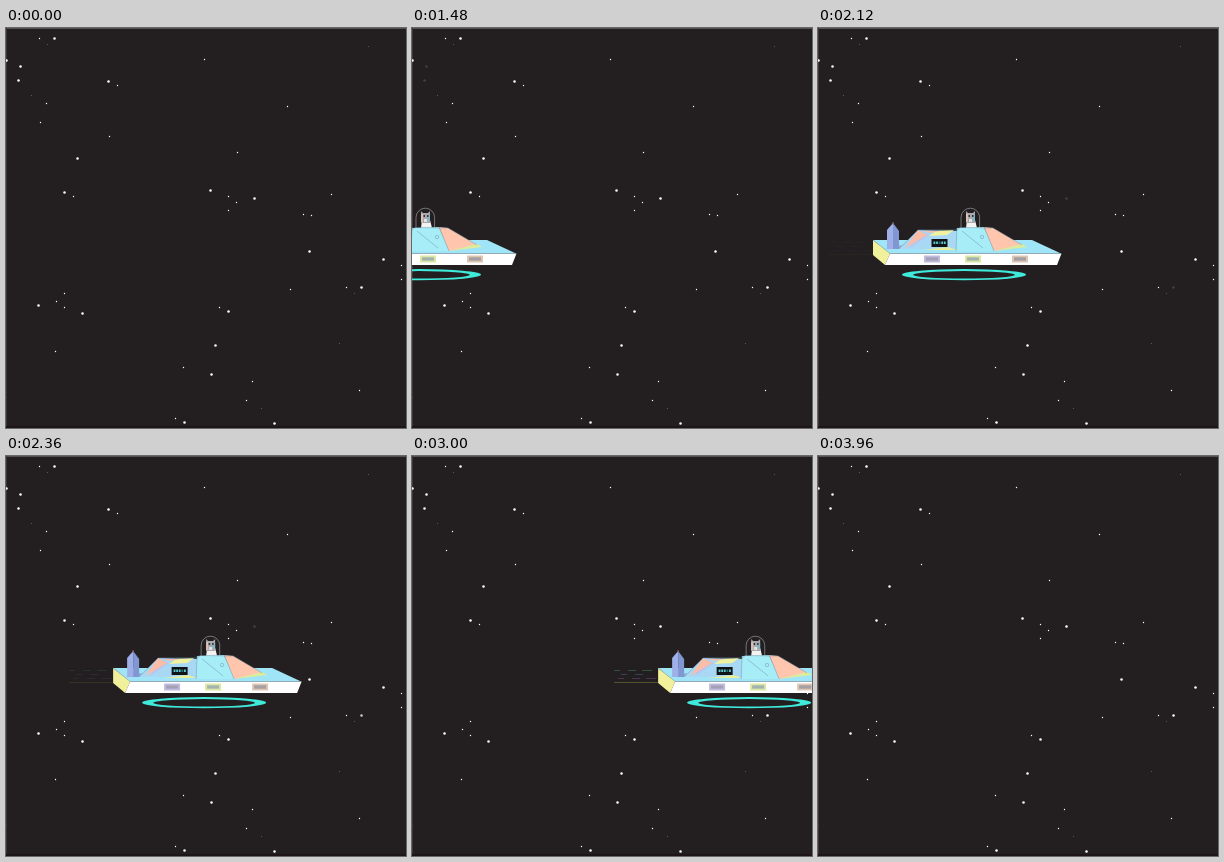
These frames come from a looping animation (400 px wide and 400 px high, 4 s). An HTML page with a canvas:

```html
<!DOCTYPE html>
<html lang="en">
<head>
<meta charset="utf-8">
<title>Spaceship</title>
<style>
html, body { margin: 0; width: 100%; height: 100%; overflow: hidden; background: #231f20; }
canvas { display: block; width: 400px; height: 400px; }
</style>
</head>
<body>
<canvas id="stage" width="400" height="400"></canvas>
<script>
const c = document.getElementById('stage').getContext('2d');
const LOOP = 4000, STEP = 40, SPEED = 0.2172, FADE = 160;
const NIGHT = '#231f20', EDGE = '#7193a8';

const clamp = v => Math.max(0, Math.min(1, v));

function rect(x, y, w, h, fill) {
  c.fillStyle = fill;
  c.fillRect(x, y, w, h);
}

function trace(points) {
  c.beginPath();
  for (let i = 0; i < points.length; i += 2) c.lineTo(points[i], points[i + 1]);
}

function poly(fill, ...points) {
  trace(points);
  c.fillStyle = fill;
  c.fill();
}

function line(color, ...points) {
  trace(points);
  c.strokeStyle = color;
  c.lineWidth = .5;
  c.stroke();
}

function star(x, y, radius) {
  c.beginPath();
  c.arc(x + .5, y + .5, radius, 0, 7);
  c.fillStyle = '#fff';
  c.fill();
}
const big = (x, y) => star(x, y, 1.25);
const small = (x, y) => star(x, y, .7);
const faint = (x, y) => star(x, y, .35);

// The same star together with its half-turn copy
function both(draw, x, y) {
  draw(x, y);
  draw(280 - x, 447 - y);
}

function pair(x, y) {
  both(big, x, y);
  both(small, x + 9, y + 4);
}

function trio(x, y) {
  small(x, y);
  faint(x + 8, y + 6);
  big(x + 15, y);
}

function knot(x, y) {
  both(big, x, y);
  both(small, x + 18, y + 6);
  both(small, x + 26, y + 12);
  both(small, x + 18, y + 20);
  both(big, x + 44, y + 8);
}

function dim(t, x, y, out, back) {
  c.globalAlpha = .85 * (clamp((t - out) / FADE) - clamp((t - back) / FADE));
  rect(x - 1, y - 1, 3, 3, NIGHT);
  c.globalAlpha = 1;
}

function sky(t) {
  rect(0, 0, 400, 400, NIGHT);
  rect(0, 0, 400, 1, '#555253');
  rect(0, 0, 1, 400, '#3b3738');
  rect(0, 398, 400, 2, '#1d1518');

  trio(33, 10);
  trio(340, 259);
  knot(204, 162);
  big(377, 231);
  small(395, 237);
  small(395, 251);
  pair(58, 164);
  pair(102, 53);
  both(big, 71, 130);
  both(big, 12, 52);
  both(small, 103, 108);
  both(small, 34, 94);
  both(small, 40, 75);
  both(small, 231, 124);
  both(small, 281, 78);
  both(faint, 25, 67);
  big(0, 32);
  big(14, 38);
  big(303, 223);
  big(205, 346);
  small(198, 31);
  small(297, 186);
  small(305, 187);
  small(325, 166);
  small(284, 261);
  small(353, 362);
  faint(362, 18);
  faint(333, 315);

  dim(t, 14, 38, 360, 1640);
  dim(t, 12, 52, 360, 1640);
  dim(t, 303, 223, 360, 760);
  dim(t, 355, 259, 1640, 2240);
  dim(t, 248, 170, 1880, 2400);
  dim(t, 32, 277, 3240, 3800);
}

function trails(t) {
  const colors = ['#4c9b68', '#4b79a5', '#80589c'];
  c.globalAlpha = .7 * clamp((t - 2000) / 1200);
  colors.forEach((color, row) => {
    for (let i = 0; i < 3 - row % 2; i++)
      rect(11 + i * 14 + row * 7 % 10, 214 + row * 4, 6 + i * 2, .7, color);
  });
  rect(11, 226, 44, .8, '#8b9140');
  c.globalAlpha = 1;
}

function ring() {
  c.beginPath();
  c.ellipse(146, 246.7, 62, 5.6, 0, 0, 7);
  c.ellipse(146, 246.8, 51, 3.7, 0, 0, 7);
  c.fillStyle = '#3feadb';
  c.fill('evenodd');
}

function windowPanel(x, frame, pane) {
  rect(x, 227.5, 16, 7, frame);
  rect(x + 2, 229, 12, 4, pane);
  rect(x + 2, 230.7, 12, .6, '#858794');
}

function hull() {
  poly('#a0e5f7', 55, 212, 214, 212, 243, 225.5, 71, 225.5);
  poly('#f1f19b', 55, 212, 72, 225.5, 67, 237, 55, 227);
  poly('#fff', 72, 225.5, 243.5, 225.5, 239, 237, 67, 237);
  line(EDGE, 55, 212, 72, 225.5, 243, 225.5);
  windowPanel(106, '#c2b9de', '#b0abc4');
  windowPanel(147, '#dde7a0', '#b2c4b4');
  windowPanel(194, '#dfc6b2', '#b5aaa8');
}

function crystal() {
  poly('#8ba6cf', 67, 221, 81, 221, 84, 217);
  poly('#9fb0e8', 69, 221, 69, 202, 75, 195, 75, 221);
  poly('#8097d2', 75, 221, 75, 195, 81, 203, 81, 221);
  rect(74.5, 194, 1, 3, '#9a6480');
}

function pilot() {
  poly('#f4f2f1', 148, 200, 149, 192, 157, 192, 159, 200);
  poly('#a9a9ad', 148, 183, 150, 185, 155, 185, 157, 183, 157, 195, 148, 195);
  rect(148, 186, 2, 8, '#dcc0b4');
  rect(154, 187, 3, 6, '#86b4c4');
  rect(150.5, 187, 1.5, 2, '#343238');
  rect(154, 187, 1.5, 2, '#343238');
  rect(151, 191, 3, 3, '#e4e2e0');

  c.beginPath();
  c.moveTo(143, 200);
  c.arc(152.3, 189.5, 9.3, Math.PI, 0);
  c.lineTo(161.6, 200);
  c.strokeStyle = '#96999b';
  c.lineWidth = .7;
  c.stroke();
}

function screen(t) {
  rect(113.5, 211, 16, 8, '#101417');
  for (let i = 0; i < 5; i++) {
    const lit = (i + t / (2 * STEP) | 0) % 4;
    rect(115.5 + i * 2.6, 213.5, 1.8, 2.5, lit ? '#58cbd0' : '#286b78');
  }
}

function cabin(t) {
  poly('#a9d8f5', 81, 221, 100, 202, 139, 203, 139, 222);
  poly('#b9c4f0', 92, 220, 100, 202, 111, 207);
  poly('#f9bda8', 87, 220, 100, 202, 109, 207);
  poly('#f0f2a0', 111, 208, 118, 203, 136, 202, 129, 207);
  poly('#f7bfae', 104, 203, 122, 203, 112, 205);
  poly('#e7ef9c', 105, 222, 130, 219, 139, 222);
  poly('#a7edf7', 138, 223, 139, 200, 166, 199, 177, 223);
  poly('#ffc5ad', 166, 199, 175, 200, 204, 217, 176, 223);
  poly('#dcec9b', 176, 223, 204, 216, 209, 219);
  line(EDGE, 81, 221, 100, 202, 139, 202, 142, 199.5, 175, 200, 204, 217);
  line(EDGE, 139, 200, 138, 223);
  line(EDGE, 166, 199, 176, 223);
  line(EDGE, 144, 203, 165, 220);
  c.beginPath();
  c.arc(164, 209, 1.7, 0, 7);
  c.stroke();
  screen(t);
}

function ship(t) {
  c.save();
  c.translate(SPEED * (t - 2120), 0);
  trails(t);
  ring();
  hull();
  crystal();
  pilot();
  cabin(t);
  c.restore();
}

function frame(now) {
  const t = Math.floor(now % LOOP / STEP) * STEP;
  sky(t);
  ship(t);
  requestAnimationFrame(frame);
}
requestAnimationFrame(frame);
</script>
</body>
</html>
```
